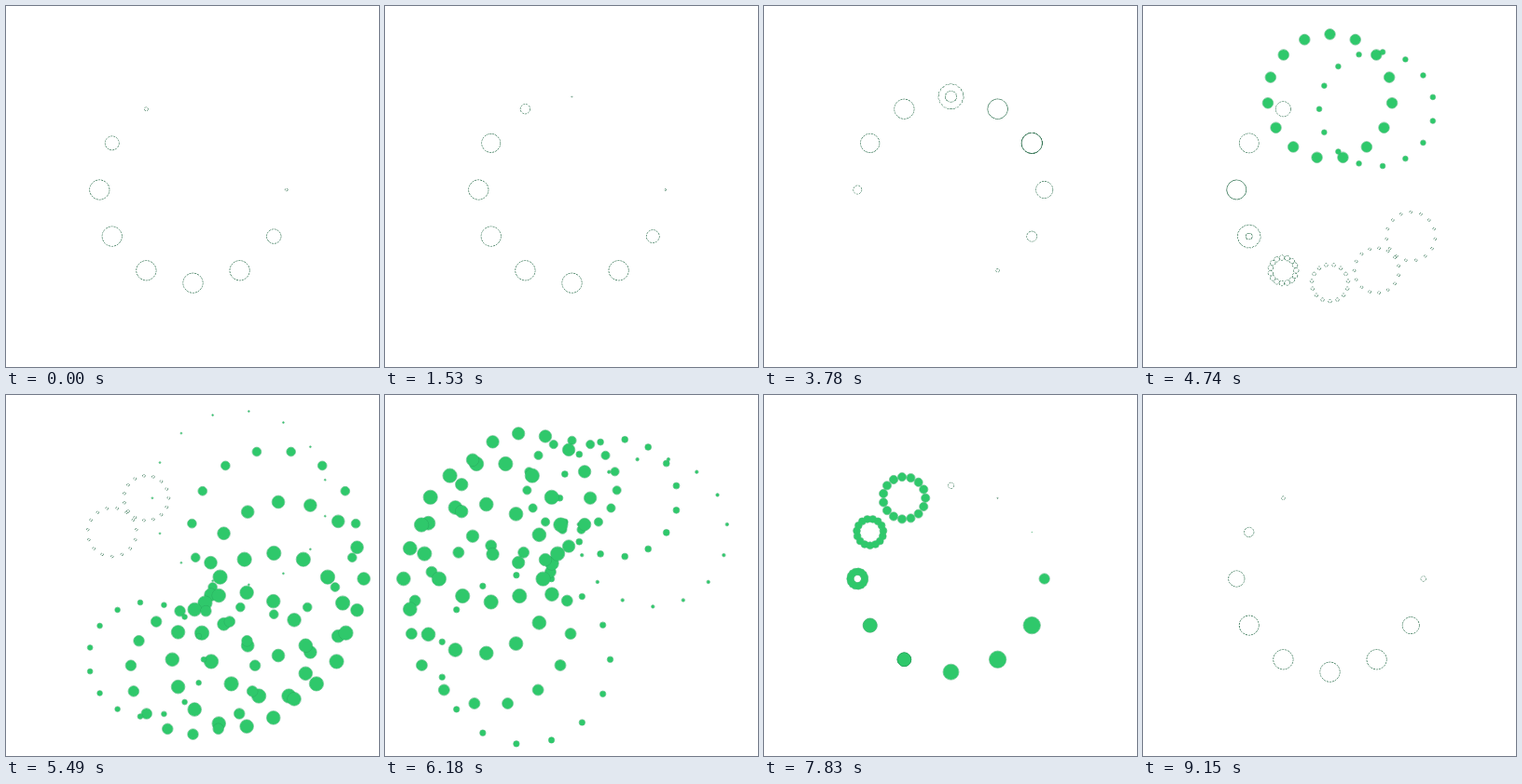
Write an HTML page with a canvas that moves like this. It is 400 px wide and 388 px high and loops after 9.18 s.

```html
<!DOCTYPE html>
<html lang="en">
<head>
<meta charset="utf-8">
<title>Ring loader</title>
<style>
html, body { margin: 0; width: 100%; height: 100%; overflow: hidden; background: #fff; }
canvas { display: block; width: 400px; height: 388px; }
</style>
</head>
<body>
<canvas id="stage" width="400" height="388"></canvas>
<script>
const ctx = document.getElementById('stage').getContext('2d');
const LOOP = 9180, DOTS = 12, SPARKS = 15, STAGGER = 125;
const CX = 200.5, CY = 197.5, RING = 100.2, DOT = 10.5;
const GREEN = '#2fc86b', RIM = '#279a58', LINE = '#256b48';
const BURST = 3017, BURST_END = 4600;

// start, growing time, start of shrinking (for the top dot)
const PULSES = [
  [-1470, 350, -605],
  [-15, 350, 910],
  [1480, 350, 2490],
  [7628, 560, 8575]
];

const clamp = x => Math.min(1, Math.max(0, x));
const part = (t, start, time) => clamp((t - start) / time);
const sine = x => (1 - Math.cos(Math.PI * x)) / 2;
const ease = (t, start, time) => sine(part(t, start, time));
const hump = (t, start, time) => Math.sin(Math.PI * part(t, start, time));

function pulse(t) {
  const sizes = PULSES.map(([start, grow, shrink]) =>
    DOT * (ease(t, start, grow) - ease(t, shrink, 300)));
  return { r: Math.max(...sizes), spread: 0, solid: false };
}

function burst(t) {
  // swell, then split into a small open ring
  if (t < 500) return { r: DOT * ease(t, 0, 520), spread: 0, solid: false };
  if (t < 1300) {
    const r = 1.2 + 9.3 * (1 - part(t, 500, 750)) ** 3;
    return { r, spread: 26.3 * ease(t, 410, 850), solid: false };
  }
  // solid sparks fly outwards
  if (t < 2600) {
    const r = 7.7 * Math.max(0, hump(t, 1540, 820)) ** 0.65;
    return { r, spread: 56.5 + 38.5 * part(t, 1480, 900), solid: true };
  }
  // and fall back into one dot
  const r = 5.1 * hump(t, 2800, 1000) +
    9.2 * (ease(t, 3450, 750) - ease(t, 4320, 280));
  return { r, spread: 97 * (1 - part(t, 2800, 1240)) ** 2, solid: true };
}

function trace(points, r) {
  ctx.beginPath();
  for (const [x, y] of points) {
    ctx.moveTo(x + r, y);
    ctx.arc(x, y, r, 0, 2 * Math.PI);
  }
}

function drawSparks(points, r, solid) {
  // stroke first, so the fill leaves one outline around the merged shape
  trace(points, r);
  ctx.setLineDash(solid ? [] : [2, 1]);
  ctx.lineWidth = solid ? 0.5 : 1;
  ctx.strokeStyle = solid ? RIM : LINE;
  ctx.stroke();
  trace(points, Math.max(0, r - 0.2));
  ctx.fillStyle = solid ? GREEN : '#fff';
  ctx.fill();
}

function drawDot(k, time) {
  const angle = (k * 30 - 90) * Math.PI / 180;
  const x = CX + RING * Math.cos(angle), y = CY + RING * Math.sin(angle);
  const t = time - k * STAGGER, since = t - BURST;
  const bursting = since > 0 && since < BURST_END;
  const { r, spread, solid } = bursting ? burst(since) : pulse(t);
  if (r < 0.2) return;

  const points = Array.from({ length: spread ? SPARKS : 1 }, (_, j) => {
    const a = angle + j * 2 * Math.PI / SPARKS;
    return [x + spread * Math.cos(a), y + spread * Math.sin(a)];
  });
  drawSparks(points, r, solid);
}

function frame(now) {
  const time = (now - begin + LOOP) % LOOP;
  ctx.fillStyle = '#fff';
  ctx.fillRect(0, 0, 400, 388);
  for (let k = 0; k < DOTS; k++) drawDot(k, time);
  requestAnimationFrame(frame);
}

const begin = performance.now();
frame(begin);
</script>
</body>
</html>
```
